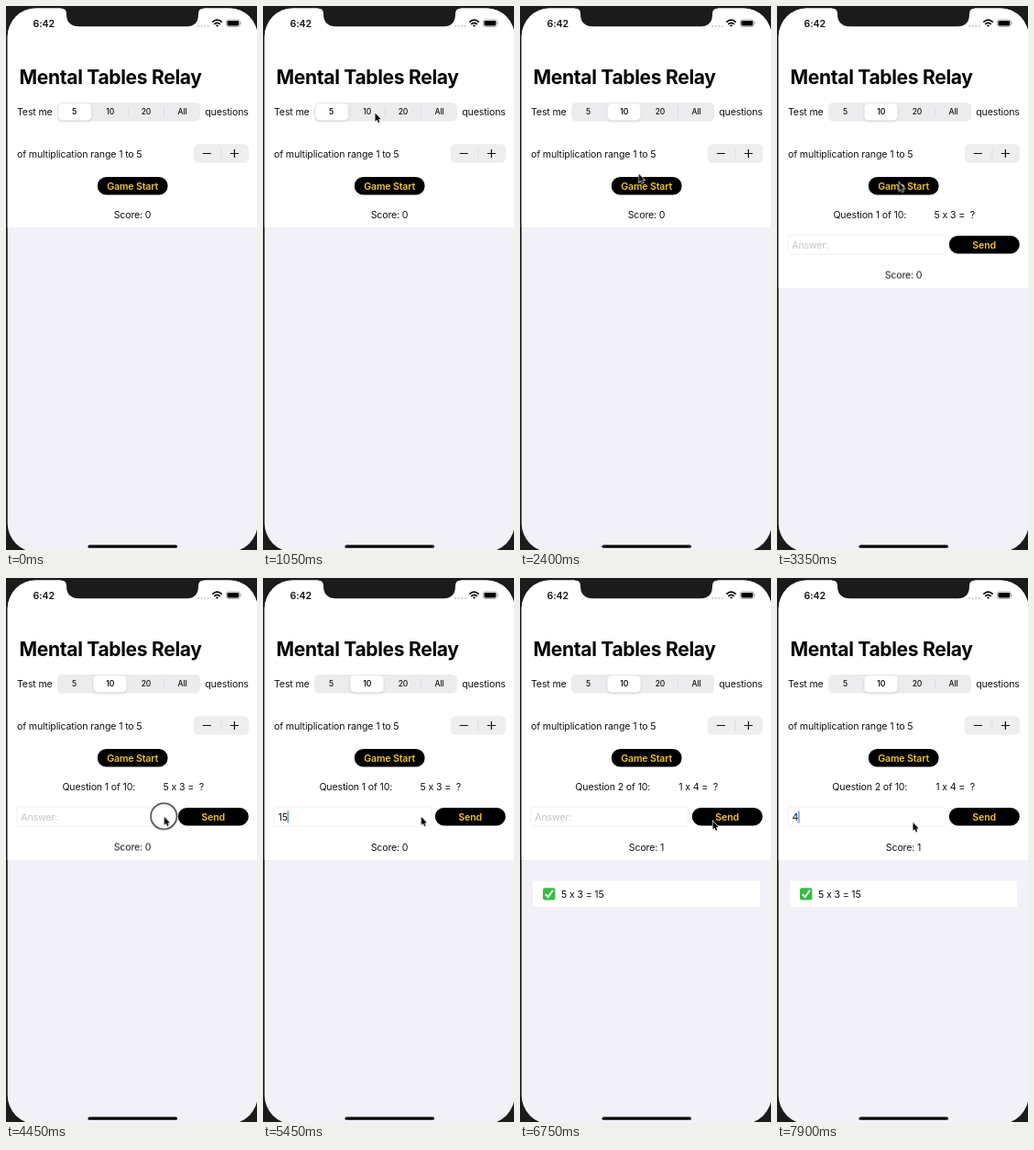
An HTML page that plays this animation: 274 px wide and 592 px high, repeating every 8 s.

```html
<!DOCTYPE html>
<html lang="en">
<head>
<meta charset="utf-8">
<title>Mental Tables Relay</title>
<style>
  html, body { margin: 0; width: 100%; height: 100%; overflow: hidden; background: #1b1b1c; }
  svg { display: block; width: 100vw; height: 100vh; }
  text { font: 400 10.6px Inter, "Open Sans", sans-serif; letter-spacing: -.15px; fill: #111; white-space: pre; }
  .title { font-size: 21px; font-weight: 700; letter-spacing: -.3px; fill: #000; }
  .clock { font-weight: 600; letter-spacing: -.1px; }
  .seg text { font-size: 8.5px; font-weight: 500; letter-spacing: -.1px; }
  .mid text, .gold { text-anchor: middle; }
  .end { text-anchor: end; }
  .end text { text-anchor: end; }
  .gold { fill: #f3c32f; font-weight: 600; }
  .hint { fill: #c5c5c7; }
  .line { stroke: #d6d6d9; stroke-width: .7; }
  .thumb { filter: drop-shadow(0 1px 1.5px rgba(0, 0, 0, .16)); }
</style>
</head>
<body>
<svg viewBox="0 0 274 592">
  <defs>
    <clipPath id="screen"><rect x="1.7" y="2.5" width="273" height="591.5" rx="31"/></clipPath>
  </defs>

  <g clip-path="url(#screen)">
    <rect width="275" height="594" fill="#f1f1f7"/>
    <rect id="panel" y="-100" width="275" height="341" fill="#fff"/>

    <text class="clock" x="29.5" y="23">6:42</text>
    <path d="M210 22h11" stroke="#c9c9cb" stroke-width="2.2" stroke-linecap="round" stroke-dasharray="0 3.6"/>
    <g fill="none" stroke="#000" stroke-width="1.7">
      <path d="M225.3 17.6Q230.5 12.6 235.7 17.6M227.2 19.8Q230.5 16.8 233.8 19.8"/>
      <path d="M228.9 21.1Q230.5 19.8 232.1 21.1L230.5 22.8Z" fill="#000" stroke="none"/>
    </g>
    <rect x="240.4" y="14.9" width="15" height="7.6" rx="2.2" fill="none" stroke="#8e8e90" stroke-width=".7"/>
    <rect x="241.5" y="16" width="12.8" height="5.4" rx="1.3"/>
    <path d="M256.4 17.4Q257.8 18.7 256.4 20Z" fill="#8e8e90"/>

    <text class="title" x="14.5" y="84.5">Mental Tables Relay</text>

    <text x="12" y="118.7">Test me</text>
    <text class="end" x="264.7" y="118.7">questions</text>
    <g class="seg mid">
      <rect x="56" y="105" width="156" height="20.5" rx="5.5" fill="#ececee"/>
      <path id="divider" class="line" d="M133.5 110v10.5"/>
      <path class="line" d="M172.5 110v10.5"/>
      <rect id="thumb" class="thumb" x="57" y="106.2" width="36.2" height="18.2" rx="4.5" fill="#fff"/>
      <text id="five" x="74.5" y="118.2">5</text>
      <text id="ten" x="113.7" y="118.2">10</text>
      <text x="153" y="118.2">20</text>
      <text x="192.5" y="118.2">All</text>
    </g>

    <text x="12" y="164.5">of multiplication range 1 to 5</text>
    <rect x="204.7" y="150.2" width="60.3" height="20.6" rx="5.5" fill="#eeeeef"/>
    <path class="line" d="M235 155v11"/>
    <path d="M214.7 160.5h9.2M244.8 160.5h9.2M249.4 155.9v9.2" stroke="#111" stroke-width="1.2"/>

    <rect x="99.8" y="186" width="76.8" height="19.6" rx="9.8"/>
    <text id="start" class="gold" x="138.2" y="199.7">Game Start</text>

    <g id="quiz">
      <g id="question" class="mid"></g>
      <g id="product" class="end"></g>
      <rect x="12" y="249" width="171.8" height="21.2" rx="3.5" fill="#fff" stroke="#ebebed" stroke-width=".8"/>
      <text id="hint" class="hint" x="16.3" y="263.7">Answer:</text>
      <g id="answer"></g>
      <rect id="caret" x="16.4" y="253.3" width="1.3" height="13.4" rx=".6" fill="#3b78e7"/>
      <rect x="187.8" y="250" width="77" height="19.4" rx="9.7"/>
      <text id="send" class="gold" x="226.2" y="263.7">Send</text>
    </g>

    <g id="score" class="mid"></g>

    <g id="row">
      <rect x="14" y="329.7" width="248" height="28.2" fill="#fff"/>
      <rect x="25" y="337.2" width="13.4" height="13.2" rx="2.2" fill="#36bd45"/>
      <path d="M27.8 344.2L30.7 347.3L35.8 339.9" fill="none" stroke="#fff" stroke-width="1.9"/>
      <text x="45" y="347.6">5 x 3 = 15</text>
    </g>

    <rect x="89.5" y="586.6" width="97.5" height="3.2" rx="1.6"/>
  </g>

  <path d="M60 0V2.5Q66 2.5 66 8.5Q66 22.3 80 22.3H197Q210 22.3 210 8.5Q210 2.5 216 2.5V0Z" fill="#1b1b1c"/>

  <g id="pointer">
    <g id="ring" fill="none">
      <circle r="14.2" stroke="#fff" stroke-opacity=".6" stroke-width="2.4"/>
      <circle r="14.2" stroke="#111" stroke-width="1.3"/>
    </g>
    <path d="M.5 .6V9.6L2.5 7.8L3.9 10.9L5.3 10.2L4 7.2H6.7Z" stroke="#fff" stroke-width="1.2" paint-order="stroke"/>
  </g>
</svg>

<script>
  const LOOP = 8000;
  const TAP = 250;
  const EASE = 'ease-in-out';
  const HOLD = 'step-end';
  const byId = id => document.getElementById(id);

  // steps: [time, value, easing towards the next step]; end values are held
  function animate(node, property, steps) {
    const last = steps[steps.length - 1];
    const frames = [[0, steps[0][1], HOLD], ...steps, [LOOP, last[1]]]
      .map(([time, value, easing = 'linear']) => ({ offset: time / LOOP, [property]: value, easing }));
    node.animate(frames, { duration: LOOP, iterations: Infinity });
  }

  const shift = (x, y) => `translate(${x}px, ${y}px)`;
  const tween = (id, property, start, length, from, to) =>
    animate(byId(id), property, [[start, from, EASE], [start + length, to]]);
  const slide = (id, start, length, x, y) =>
    tween(id, 'transform', start, length, shift(0, 0), shift(x, y));
  const jump = (node, property, ...steps) =>
    animate(node, property, steps.map(([time, value]) => [time, value, HOLD]));
  const dim = (id, down, level) =>
    animate(byId(id), 'opacity', [[down, 1], [down + 50, level], [down + TAP, level], [down + 2 * TAP, 1]]);

  // One text per state, each visible until the next state begins
  function sequence(id, x, y, states) {
    return states.map(([time, label], i) => {
      const node = document.createElementNS('http://www.w3.org/2000/svg', 'text');
      node.setAttribute('x', x);
      node.setAttribute('y', y);
      node.textContent = label;
      byId(id).append(node);
      const end = i + 1 < states.length ? states[i + 1][0] : LOOP;
      jump(node, 'opacity', [0, time ? 0 : 1], [time, 1], [end, 0]);
      return { time, label, width: label && node.getComputedTextLength() };
    });
  }

  // Pointer stops: travel time, place, and the moment of the tap if there is one
  const stops = [
    { leave: 0, arrive: 0, x: 222, y: 190 },
    { leave: 400, arrive: 1000, x: 122, y: 116, tap: 1600 },
    { leave: 1930, arrive: 2530, x: 130, y: 189, tap: 2700 },
    { leave: 3300, arrive: 3700, x: 210, y: 266 },
    { leave: 4100, arrive: 4300, x: 172.3, y: 259.3, tap: 4300 },
    { leave: 6000, arrive: 6150, x: 210, y: 264, tap: 6150 },
    { leave: 6850, arrive: 7200, x: 148, y: 265.5 }
  ];
  const [pick, begin, focus, send] = stops.flatMap(({ tap }) => tap || []);
  const begun = begin + TAP;
  const sent = send + TAP;

  const place = ({ x, y }) => shift(x, y);
  animate(byId('pointer'), 'transform', stops.slice(1).flatMap((stop, i) =>
    [[stop.leave, place(stops[i]), EASE], [stop.arrive, place(stop)]]));
  jump(byId('pointer'), 'opacity', [0, 0], [stops[1].leave, 1]);
  animate(byId('ring'), 'opacity', [pick, begin, focus, send].flatMap(down =>
    [[down, 0], [down + 50, 1], [down + TAP - 100, 1], [down + TAP, 0]]));

  // Picking ten questions
  slide('thumb', pick + 100, TAP, 38.4, 0);
  tween('divider', 'opacity', pick + 100, TAP, 1, 0);
  jump(byId('five'), 'fontWeight', [0, 600], [pick + 150, 500]);
  jump(byId('ten'), 'fontWeight', [0, 500], [pick + 150, 600]);

  // Starting the game
  dim('start', begin, .6);
  slide('panel', begun, TAP, 0, 66);
  slide('score', begun, TAP, 0, 65.5);
  tween('quiz', 'opacity', begun, TAP, 0, 1);

  // Typing and sending; the caret follows the typed text
  const typed = sequence('answer', 16.5, 263.7,
    [[0, ''], [5200, '1'], [5450, '15'], [sent, ''], [7350, '4']]);
  jump(byId('hint'), 'opacity', ...typed.map(({ time, label }) => [time, label ? 0 : 1]));
  jump(byId('caret'), 'transform', ...typed.map(({ time, width }) => [time, shift(+width, 0)]));
  jump(byId('caret'), 'opacity', [0, 0], [4850, 1], [6000, 0], [6900, 1]);
  dim('send', send, .8);

  // Result of the first answer
  sequence('question', 101.3, 231, [[0, 'Question 1 of 10:'], [sent, 'Question 2 of 10:']]);
  sequence('product', 216, 231, [[0, '5 x 3 =  ?'], [sent, '1 x 4 =  ?']]);
  sequence('score', 138, 231, [[0, 'Score: 0'], [sent, 'Score: 1']]);
  tween('row', 'opacity', sent, TAP, 0, 1);
</script>
</body>
</html>
```
